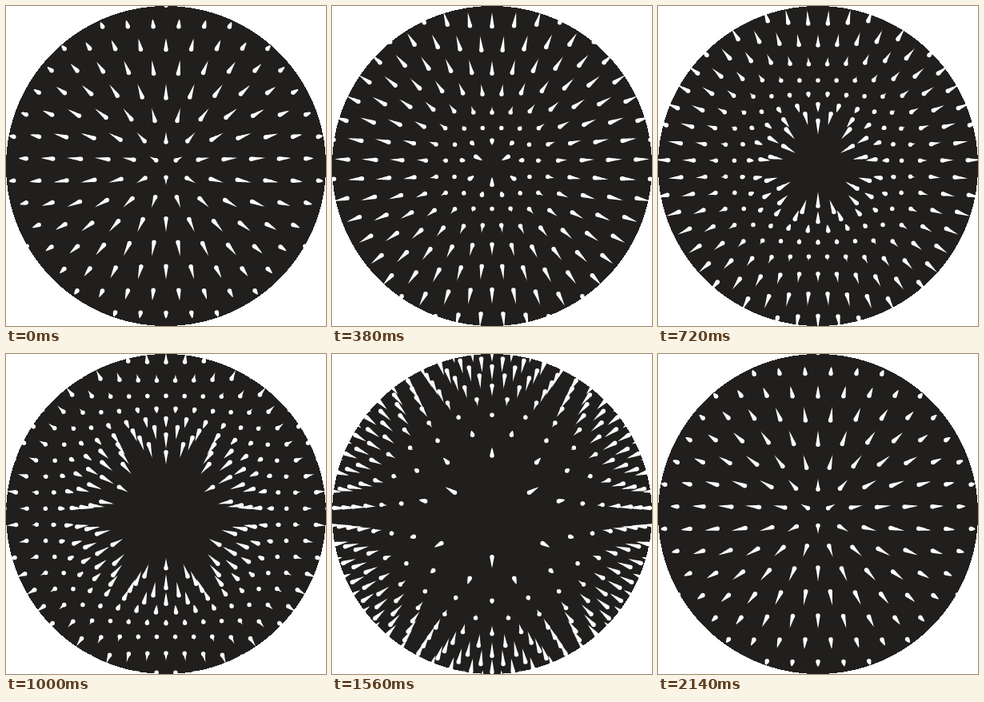
Write an HTML page with a canvas that moves like this. It is 400 by 400 pixels and loops after 2.16 s.

```html
<!DOCTYPE html>
<html>
<head>
<meta charset="utf-8">
<style>
html, body { margin: 0; width: 100%; height: 100%; overflow: hidden; background: #fff; }
canvas { display: block; width: 400px; height: 400px; }
</style>
</head>
<body>
<canvas id="stage" width="400" height="400"></canvas>
<script>
const ctx = document.getElementById('stage').getContext('2d');
const TAU = Math.PI * 2;
const PERIOD = 2160, STEP = 20;
const MID = 200;
const ROW = 20, GAP = ROW * 2 / Math.sqrt(3);  // triangular lattice
const PUSH = 57.5;       // greatest outward shift
const WAVE = 348;        // wavelength of the ripple
const TRAIL = 0.11;      // tail length in periods
const SAMPLES = 24, HEAD = 2.75;

// Lattice centred on the middle of a triangle
const dots = [];
for (let k = -11; k <= 11; k++) {
  const y = GAP / Math.sqrt(3) - k * ROW;
  for (let j = -10; j <= 10; j++) {
    const x = (j + (k & 1) / 2) * GAP;
    const r = Math.hypot(x, y);
    if (r < 212) dots.push({ r, cos: x / r, sin: y / r });
  }
}

const radiusAt = (r, t) => r + PUSH * (1 - Math.cos(TAU * (t - r / WAVE))) / 2;

// Disc with a crisp, stepped edge
function drawDisc() {
  ctx.fillStyle = '#201f1e';
  for (let y = 0; y < 400; y++) {
    const w = Math.round(Math.sqrt(MID * MID - (y + 0.5 - MID) ** 2));
    ctx.fillRect(MID - w, y, 2 * w, 1);
  }
}

function drawDrop(dot, t) {
  if (radiusAt(dot.r, t) > 235) return;
  ctx.beginPath();
  for (let i = 0; i < SAMPLES; i++) {
    const s = i / SAMPLES;
    const d = radiusAt(dot.r, t - s * TRAIL);
    const x = MID + d * dot.cos, y = MID + d * dot.sin;
    const size = HEAD * Math.pow(1 - s, 1.15);
    ctx.moveTo(x + size, y);
    ctx.arc(x, y, size, 0, TAU);
  }
  ctx.fill();
}

function frame() {
  const now = performance.now() % PERIOD;
  const t = Math.floor(now / STEP) * STEP / PERIOD;
  ctx.fillStyle = '#fff';
  ctx.fillRect(0, 0, 400, 400);
  drawDisc();
  ctx.fillStyle = '#fff';
  for (const dot of dots) drawDrop(dot, t);
  requestAnimationFrame(frame);
}
frame();
</script>
</body>
</html>
```
